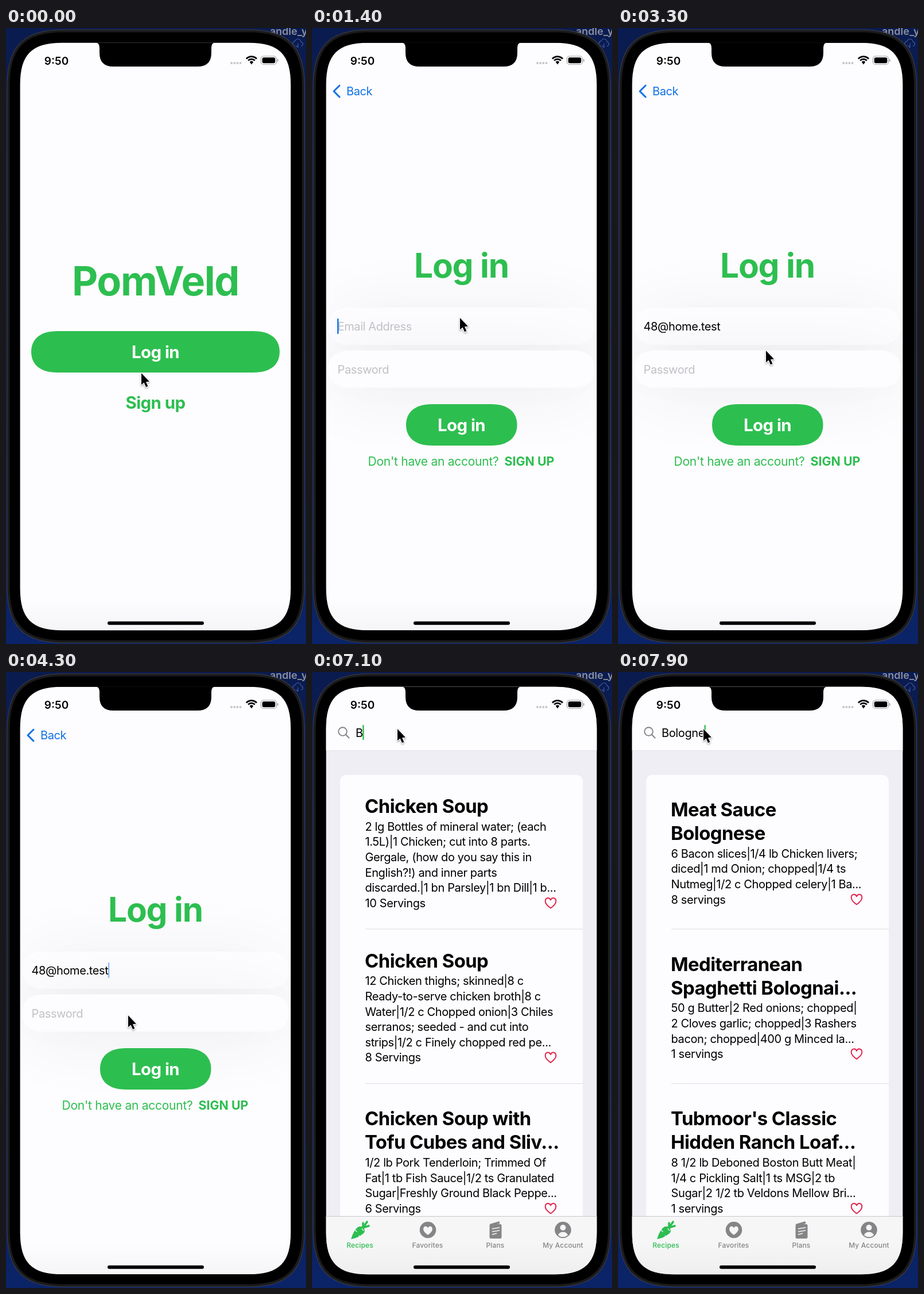
These frames come from a looping animation (523 px wide and 1071 px high, 8000 ms). An HTML page with a canvas:

```html
<!DOCTYPE html>
<html lang="en">
<head>
<meta charset="utf-8">
<title>Recipe app</title>
<style>
html, body { margin: 0; width: 523px; height: 1071px; overflow: hidden; background: #0a1433; }
canvas { display: block; width: 523px; height: 1071px; }
</style>
</head>
<body>
<canvas id="stage"></canvas>
<script>
const W = 523, H = 1071, LOOP = 8000;
const canvas = document.getElementById('stage');
const c = canvas.getContext('2d');
const dpr = window.devicePixelRatio || 1;
canvas.width = W * dpr;
canvas.height = H * dpr;

const GREEN = '#2dbe50', BLUE = '#0f72e5', PAPER = '#fdfcfe', GREY = '#858587', HINT = '#c1c0c5', BAR = '#f6f6f7';
const SCREEN = { x: 24.6, y: 25.7, w: 471.8, h: 1021.6 };
const EMAIL = '48@home.test', QUERY = 'Bologne';

const soups = [
  { title: ['Chicken Soup'], servings: '10 Servings', body: [
    '2 lg Bottles of mineral water; (each', '1.5L)|1 Chicken; cut into 8 parts.',
    'Gergale, (how do you say this in', 'English?!) and inner parts',
    'discarded.|1 bn Parsley|1 bn Dill|1 b...'] },
  { title: ['Chicken Soup'], servings: '8 Servings', body: [
    '12 Chicken thighs; skinned|8 c', 'Ready-to-serve chicken broth|8 c',
    'Water|1/2 c Chopped onion|3 Chiles', 'serranos; seeded - and cut into',
    'strips|1/2 c Finely chopped red pe...'] },
  { title: ['Chicken Soup with', 'Tofu Cubes and Sliv...'], servings: '6 Servings', body: [
    '1/2 lb Pork Tenderloin; Trimmed Of', 'Fat|1 tb Fish Sauce|1/2 ts Granulated',
    'Sugar|Freshly Ground Black Peppe...'] }
];
const sauces = [
  { title: ['Meat Sauce', 'Bolognese'], servings: '8 servings', body: [
    '6 Bacon slices|1/4 lb Chicken livers;', 'diced|1 md Onion; chopped|1/4 ts',
    'Nutmeg|1/2 c Chopped celery|1 Ba...'] },
  { title: ['Mediterranean', 'Spaghetti Bolognai...'], servings: '1 servings', body: [
    '50 g Butter|2 Red onions; chopped|', '2 Cloves garlic; chopped|3 Rashers',
    'bacon; chopped|400 g Minced la...'] },
  { title: ["Tubmoor's Classic", 'Hidden Ranch Loaf...'], servings: '1 servings', body: [
    '8 1/2 lb Deboned Boston Butt Meat|', '1/4 c Pickling Salt|1 ts MSG|2 tb',
    'Sugar|2 1/2 tb Veldons Mellow Bri...'] }
];

// Pointer stops: time, x, y
const stops = [
  [0, 236, 600], [100, 236, 600], [300, 240, 580], [800, 243, 570], [1150, 258, 504],
  [2850, 258, 504], [3200, 258, 561], [3850, 258, 561], [4200, 213, 597], [5580, 213, 597],
  [5780, 289, 476], [6100, 289, 476], [6500, 230, 220], [6850, 149, 99], [8000, 149, 99]
];

const clamp = (v, lo = 0, hi = 1) => Math.min(hi, Math.max(lo, v));
const smooth = p => p * p * (3 - 2 * p);
const easeOut = p => 1 - Math.pow(1 - p, 3);

function text(str, x, y, size, color, { weight = 400, align = 'left', track = -0.019 } = {}) {
  c.font = `${weight} ${size}px Inter, "Open Sans", sans-serif`;
  c.letterSpacing = size * track + 'px';
  c.textAlign = align;
  c.fillStyle = color;
  c.fillText(str, x, y);
  return c.measureText(str).width;
}
const heading = (str, y, size, color) =>
  text(str, 260.5, y, size, color, { weight: 700, align: 'center', track: -0.02 });

function box(x, y, w, h, r, fill) {
  c.beginPath();
  c.roundRect(x, y, w, h, r);
  c.fillStyle = fill;
  c.fill();
}

// Rounded box whose corners ease into the straight sides
function softPath(x, y, w, h, r) {
  const ex = Math.min(1.28 * r, w / 2), ey = Math.min(1.28 * r, h / 2);
  const kx = (2.344 * r - ex) / 3, ky = (2.344 * r - ey) / 3;
  const X = x + w, Y = y + h;
  c.beginPath();
  c.moveTo(x, y + ey);
  c.bezierCurveTo(x, y + ky, x + kx, y, x + ex, y);
  c.lineTo(X - ex, y);
  c.bezierCurveTo(X - kx, y, X, y + ky, X, y + ey);
  c.lineTo(X, Y - ey);
  c.bezierCurveTo(X, Y - ky, X - kx, Y, X - ex, Y);
  c.lineTo(x + ex, Y);
  c.bezierCurveTo(x + kx, Y, x, Y - ky, x, Y - ey);
  c.closePath();
}
function softBox(x, y, w, h, r, fill) {
  softPath(x, y, w, h, r);
  c.fillStyle = fill;
  c.fill();
}
function disc(x, y, r, fill) {
  c.beginPath();
  c.arc(x, y, r, 0, Math.PI * 2);
  c.fillStyle = fill;
  c.fill();
}
function rect(x, y, w, h, fill) {
  c.fillStyle = fill;
  c.fillRect(x, y, w, h);
}
const page = fill => rect(24, 25, 473, 1023, fill);

function line(points, color, width) {
  c.beginPath();
  points.forEach(([x, y]) => c.lineTo(x, y));
  c.strokeStyle = color;
  c.lineWidth = width;
  c.lineCap = c.lineJoin = 'round';
  c.stroke();
}
function at(x, y, draw) {
  c.save();
  c.translate(x, y);
  draw();
  c.restore();
}
function gradient(y0, y1, ...colors) {
  const g = c.createLinearGradient(0, y0, 0, y1);
  colors.forEach((color, i) => g.addColorStop(i / (colors.length - 1), color));
  return g;
}

function heartPath(s) {
  c.beginPath();
  c.moveTo(0, 9 * s);
  c.bezierCurveTo(-5 * s, 5.5 * s, -9.3 * s, 1.5 * s, -9.3 * s, -3 * s);
  c.bezierCurveTo(-9.3 * s, -9.5 * s, -2 * s, -10.5 * s, 0, -5 * s);
  c.bezierCurveTo(2 * s, -10.5 * s, 9.3 * s, -9.5 * s, 9.3 * s, -3 * s);
  c.bezierCurveTo(9.3 * s, 1.5 * s, 5 * s, 5.5 * s, 0, 9 * s);
  c.closePath();
}

// Solid while typing, then a soft blink counted from `since`
function caret(x, y, h, color, t, since) {
  const phase = t < since ? 0 : (t - since) % 1050;
  c.globalAlpha = phase < 500 ? 1 : clamp(1 - (phase - 500) / 90);
  box(x - 1, y, 2.4, h, 1, color);
  c.globalAlpha = 1;
}

function desktop() {
  rect(0, 0, W, H, gradient(0, H, '#0a1b50', '#0e1f52', '#101c42', '#0c1f56', '#0b2468'));
  text('andle_y', 460, 12, 18, '#8b8f9b', { weight: 600, track: 0 });
  c.beginPath();
  c.arc(504, 27, 4, 1.6, 4.5);
  c.arc(509, 24, 5, 3.6, 6);
  c.arc(514, 28, 3.5, 5, 7.8);
  c.strokeStyle = '#3f5a9c';
  c.lineWidth = 1.2;
  c.stroke();
  line([[509, 27], [509, 34], [506, 31]], '#3f5a9c', 1.2);
}

function phoneBody() {
  softBox(1.5, 2.5, 519.5, 1067, 79, '#414144');
  softBox(2.5, 3.5, 517.5, 1065, 78, '#1b1b1d');
  softBox(6.5, 7.5, 509.5, 1057, 74, '#000');
}

function statusBar() {
  c.beginPath();
  c.moveTo(156, 25);
  c.quadraticCurveTo(163, 26, 163, 34);
  c.lineTo(163, 43);
  c.quadraticCurveTo(163, 67, 187, 67);
  c.lineTo(334, 67);
  c.quadraticCurveTo(358, 67, 358, 43);
  c.lineTo(358, 34);
  c.quadraticCurveTo(358, 26, 365, 25);
  c.fillStyle = '#000';
  c.fill();

  text('9:50', 88, 63.5, 19, '#000', { weight: 600, align: 'center', track: 0 });
  for (let i = 0; i < 4; i++) disc(393 + i * 5.2, 61, 2, '#c6c6c8');
  c.strokeStyle = '#000';
  c.lineCap = 'butt';
  c.lineWidth = 2.8;
  for (const r of [12.4, 7.9]) {
    c.beginPath();
    c.arc(428, 62, r, -Math.PI * 0.76, -Math.PI * 0.24);
    c.stroke();
  }
  c.beginPath();
  c.moveTo(428, 63.5);
  c.arc(428, 62, 4.4, -Math.PI * 0.76, -Math.PI * 0.24);
  c.fillStyle = '#000';
  c.fill();
  c.beginPath();
  c.roundRect(444.5, 49, 27, 14.5, 4.5);
  c.strokeStyle = '#a4a4a6';
  c.lineWidth = 1.2;
  c.stroke();
  box(446.7, 51.2, 22.6, 10.1, 2.8, '#000');
  box(472.8, 54, 1.8, 4.6, 1, '#a4a4a6');
}

function landing() {
  page(PAPER);
  heading('PomVeld', 465, 70, GREEN);
  softBox(44, 527, 433, 72, 36, GREEN);
  heading('Log in', 573.5, 29.5, '#fff');
  heading('Sign up', 662, 29.5, GREEN);
}

function field(y) {
  c.save();
  c.shadowColor = 'rgba(30,25,40,0.075)';
  c.shadowBlur = 120 * dpr;
  c.shadowOffsetY = 10 * dpr;
  softBox(28, y, 465, 65, 31, PAPER);
  c.restore();
}

function login(t) {
  page(PAPER);
  field(486);
  field(560.5);
  heading('Log in', 434, 58.5, GREEN);

  const typed = EMAIL.slice(0, clamp(Math.floor((t - 1700) / 85), 0, EMAIL.length));
  const w = typed ? text(typed, 44.5, 526, 20, '#000') : (text('Email Address', 44.5, 526, 20, HINT), 0);
  if (t >= 1250 && t < 4400) {
    caret(45 + w, 505, 27, BLUE, t, t < 1700 ? 1250 : 2700);
  }

  const dots = clamp(Math.floor((t - 4700) / 160) + 1, 0, 6);
  if (!dots) text('Password', 44.5, 600.5, 20, HINT);
  for (let i = 0; i < dots; i++) disc(51 + i * 12.4, 593, 4.9, '#000');
  if (t >= 4400) caret(dots ? 44.5 + dots * 12.4 : 45, 580, 25, BLUE, t, 5500);

  softBox(164, 654, 193.5, 72, 36, GREEN);
  heading('Log in', 700.5, 29.5, '#fff');
  text("Don't have an account?", 97.5, 761, 21, GREEN, { track: -0.012 });
  text('SIGN UP', 335.5, 761, 21.4, GREEN, { weight: 700, track: 0 });
}

function backLink(p) {
  c.globalAlpha = p;
  line([[48, 100], [38, 110], [48, 120]], BLUE, 3);
  text('Back', 60 + (1 - p) * 90, 117, 20, BLUE);
  c.globalAlpha = 1;
}

function recipeCell(r, k) {
  const top = k * 268.6;
  let y = top + (r.title.length > 1 ? 239 : 233);
  r.title.forEach((s, i) =>
    text(s, 92, y + i * 41 + 12, 32.8, '#000', { weight: 700, track: -0.016 }));
  y += (r.title.length - 1) * 41 + 35.5;
  r.body.forEach((s, i) => text(s, 92.5, y + i * 26.6 + 7.3, 20, '#000'));
  y += r.body.length * 26.6;
  text(r.servings, 92.5, y + 7.3, 20, '#000');
  at(416, y, () => {
    heartPath(1);
    c.strokeStyle = '#e0294f';
    c.lineWidth = 2;
    c.stroke();
  });
  rect(93, top + 446.5, 379, 1, '#dcdbe0');
}

function carrot() {
  c.fillStyle = GREEN;
  c.beginPath();
  c.moveTo(-16, 16);
  c.quadraticCurveTo(-11, 0, -4, -5);
  c.quadraticCurveTo(3, -8, 7, -2);
  c.quadraticCurveTo(10, 4, 3, 8);
  c.quadraticCurveTo(-4, 14, -16, 16);
  c.fill();
  for (const [x, y] of [[5, -12], [12, -14], [15, -7]]) line([[5, -4], [x, y]], GREEN, 3.6);
  for (const [x, y] of [[-9, 0], [-2, 10], [3, -2]]) line([[x, y], [x + 3, y + 3]], BAR, 1.2);
}

function tabBar() {
  rect(24, 946, 473, 102, BAR);
  rect(24, 946, 473, 1, '#c9c9cc');
  at(84, 970, carrot);

  disc(202, 970, 14.3, GREY);
  at(202, 971, () => {
    heartPath(0.85);
    c.fillStyle = BAR;
    c.fill();
  });

  at(319.5, 970, () => {
    c.beginPath();
    c.moveTo(-10, -10);
    c.lineTo(7, -15);
    c.lineTo(8, -11);
    c.lineTo(-7, -8);
    c.closePath();
    c.fillStyle = GREY;
    c.fill();
    box(-10, -10, 21, 25, 2.5, GREY);
    for (const [y, w] of [[-3, 12], [2, 12], [7, 7]]) {
      line([[-5, y + 1], [-5 + w, y - 1]], BAR, 1.6);
    }
  });

  disc(437.5, 970, 14.3, GREY);
  c.save();
  c.beginPath();
  c.arc(437.5, 970, 12.3, 0, Math.PI * 2);
  c.clip();
  disc(437.5, 966, 5, BAR);
  c.beginPath();
  c.ellipse(437.5, 981, 9, 7.5, 0, 0, Math.PI * 2);
  c.fill();
  c.restore();

  ['Recipes', 'Favorites', 'Plans', 'My Account'].forEach((s, i) =>
    text(s, 83.5 + i * 118, 1001, 12, i ? GREY : GREEN, { weight: 500, align: 'center', track: 0.012 }));
}

function recipes(t) {
  page('#efeef5');
  rect(24, 25, 473, 111, PAPER);
  rect(24, 136, 473, 1, '#e4e3e9');
  box(49, 179, 423, 800, 10, PAPER);
  (t < 7600 ? soups : sauces).forEach(recipeCell);

  c.beginPath();
  c.arc(53.5, 103.5, 7.3, 0, Math.PI * 2);
  c.strokeStyle = '#838387';
  c.lineWidth = 1.9;
  c.stroke();
  line([[59, 109], [64.5, 114.5]], '#838387', 2);

  const typed = QUERY.slice(0, clamp(Math.floor((t - 7050) / 125) + 1, 0, QUERY.length));
  const w = typed ? text(typed, 76, 112.5, 20, '#000') : (text('Search', 76, 112.5, 20, HINT), 0);
  if (t >= 6850) caret(76.5 + w, 92, 26, GREEN, t, 7800);
  tabBar();
}

function pointer(t) {
  const i = stops.findIndex(s => s[0] > t);
  const [t0, x0, y0] = stops[i - 1], [t1, x1, y1] = stops[i];
  const p = smooth((t - t0) / (t1 - t0));
  at(x0 + (x1 - x0) * p, y0 + (y1 - y0) * p, () => {
    c.beginPath();
    [[0, 0], [0, 20.5], [4.6, 16.4], [8, 24.3], [11.4, 22.8], [8, 15.2], [14, 14.7]]
      .forEach(([x, y]) => c.lineTo(x, y));
    c.closePath();
    c.shadowColor = 'rgba(0,0,0,0.35)';
    c.shadowBlur = 3 * dpr;
    c.shadowOffsetY = 1.5 * dpr;
    c.strokeStyle = '#fff';
    c.lineWidth = 2.4;
    c.lineJoin = 'round';
    c.stroke();
    c.shadowColor = 'transparent';
    c.fillStyle = '#000';
    c.fill();
  });
}

function screen(t) {
  c.save();
  softPath(SCREEN.x, SCREEN.y, SCREEN.w, SCREEN.h, 57);
  c.clip();
  if (t >= 6000) {
    recipes(t);
  } else {
    const p = easeOut(clamp((t - 350) / 500));
    if (p < 1) at(-0.3 * SCREEN.w * p, 0, landing);
    if (p > 0) {
      c.save();
      c.beginPath();
      c.rect(24 + SCREEN.w * (1 - p), SCREEN.y, 473, SCREEN.h);
      c.clip();
      at(SCREEN.w * (1 - p), 0, () => login(t));
      c.restore();
      backLink(p);
    }
  }
  rect(24, 990, 473, 58, gradient(990, 1048, 'rgba(0,0,0,0)', 'rgba(0,0,0,0.03)'));
  statusBar();
  box(177, 1031.7, 168, 6, 3, '#000');
  c.restore();
}

let start;
function frame(now) {
  start ??= now;
  const t = (now - start) % LOOP;
  c.setTransform(dpr, 0, 0, dpr, 0, 0);
  desktop();
  phoneBody();
  screen(t);
  pointer(t);
  requestAnimationFrame(frame);
}
requestAnimationFrame(frame);
</script>
</body>
</html>
```
